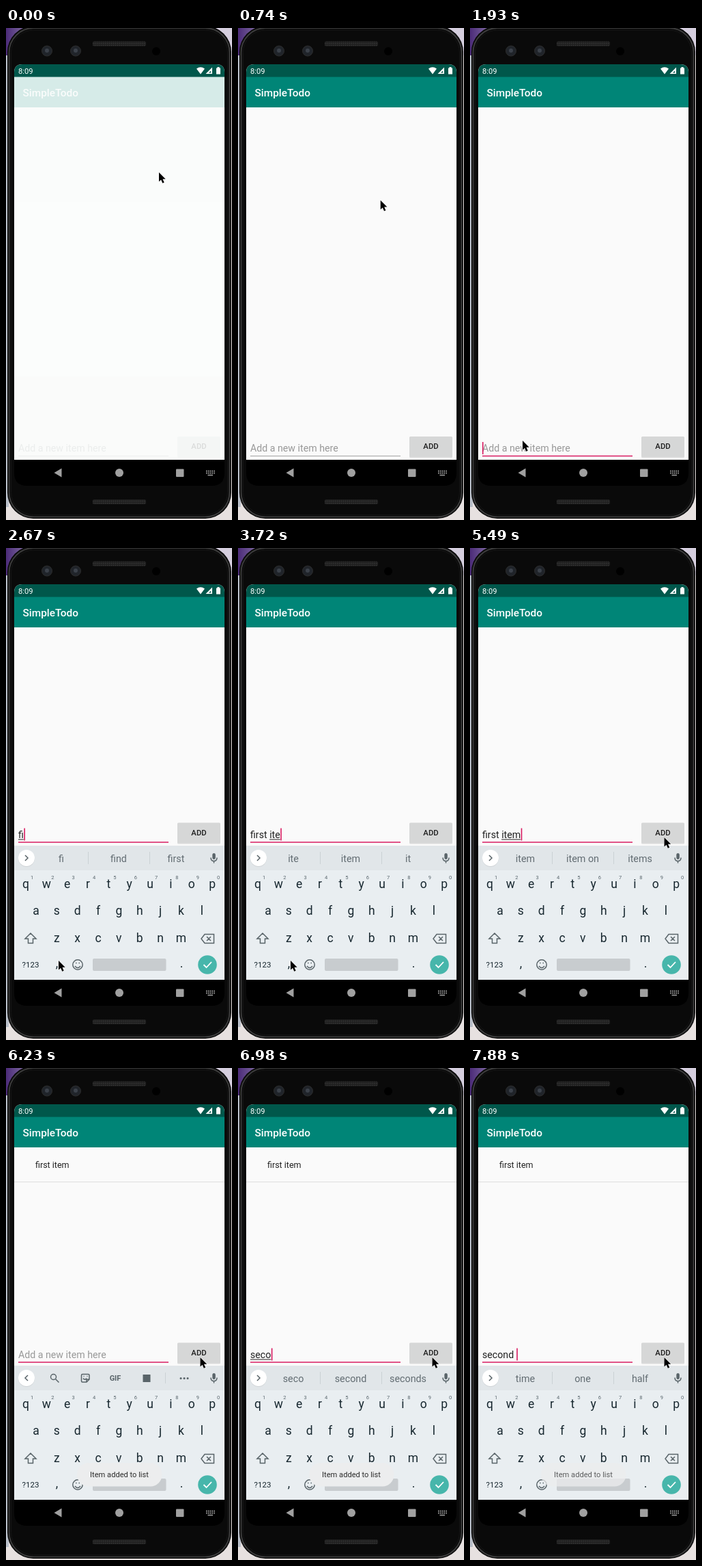
These frames come from a looping animation (331 px wide and 719 px high, 8000 ms). An HTML page:

```html
<!DOCTYPE html>
<html lang="en">
<head>
<meta charset="utf-8">
<title>Todo app demo</title>
<style>
  html, body { margin: 0; width: 100%; height: 100%; overflow: hidden; }
  svg { display: block; width: 331px; height: 719px; }
  text { font-family: Roboto, sans-serif; white-space: pre; }
  .mid { text-anchor: middle; }
  .bold { font-weight: 500; }
  .edit { font-size: 14.2px; }
  .word { font-size: 14.3px; fill: #626c72; }
  .key { font-size: 17.5px; fill: #17272f; }
  .icon { fill: none; stroke: #596469; stroke-width: 1.5; }
</style>
</head>
<body>
<svg viewBox="0 0 331 719">
  <defs>
    <linearGradient id="wall" x2="1">
      <stop offset="0" stop-color="#4b2b78"/>
      <stop offset=".15" stop-color="#a89cc0"/>
      <stop offset=".9" stop-color="#d5cede"/>
    </linearGradient>
    <pattern id="mesh" width="3" height="3" patternUnits="userSpaceOnUse">
      <rect width="3" height="3" fill="#202020"/>
      <circle cx="1.5" cy="1.5" r=".8" fill="#393939"/>
    </pattern>
    <clipPath id="screen"><path d="M12 631V65q0-12 12-12H308q12 0 12 12V631z"/></clipPath>
  </defs>

  <rect width="331" height="719" fill="#e7e1e0"/>
  <rect width="331" height="40" fill="url(#wall)"/>
  <rect y="40" width="4" height="660" fill="#b9bfc9"/>

  <!-- phone body -->
  <rect x="2" y="-3" width="328" height="720" rx="38" fill="#080808"/>
  <rect x="4.5" y="0" width="323" height="714.5" rx="36" fill="#0a0a0a" stroke="#3b3b3b" stroke-width="2"/>
  <rect x="7.5" y="3" width="317" height="708.5" rx="33" fill="#0a0a0a" stroke="#161616"/>
  <rect x="127" y="19.5" width="78" height="7" rx="2" fill="url(#mesh)"/>
  <rect x="127" y="689" width="78" height="7" rx="2" fill="url(#mesh)"/>
  <g fill="#20242a" stroke="#2d2d2d">
    <circle cx="60" cy="33.5" r="7.5"/><circle cx="102" cy="33.5" r="7.5"/>
  </g>
  <g fill="#3b414a"><circle cx="60" cy="33" r="3"/><circle cx="102" cy="33" r="3"/></g>
  <circle cx="220" cy="34" r="6" fill="#000"/>

  <g clip-path="url(#screen)">
    <rect x="12" y="53" width="308" height="578" fill="#fafcfb"/>
    <g id="app">
      <rect x="12" y="71" width="308" height="560" fill="#fafafa"/>
      <rect x="12" y="71" width="308" height="45" fill="#008577"/>
      <text x="24.5" y="100" font-size="15.4" class="bold" fill="#fff">SimpleTodo</text>
      <g id="item">
        <text x="43" y="146" font-size="12.5" fill="#222">first item</text>
        <path d="M12 166.5H320" stroke="#dedede"/>
      </g>
      <g id="form">
        <text id="hint" class="edit" x="18" y="619" fill="#989898">Add a new item here</text>
        <text id="entry" class="edit" x="18" y="619" fill="#202020"></text>
        <path id="compose" stroke="#222"/>
        <path id="line" d="M18 625.5H238"/>
        <rect id="caret" y="605" width="1.6" height="18" fill="#d81b60"/>
        <rect x="251" y="598" width="63" height="30" rx="1.5" fill="#000" opacity=".12"/>
        <rect id="button" x="251" y="597" width="63" height="29.5" rx="1.5"/>
        <text class="mid bold" x="282.5" y="615" font-size="11.3" fill="#1d1d1d">ADD</text>
      </g>
    </g>
    <rect x="12" y="53" width="308" height="18.5" fill="#00574b"/>
    <text x="18" y="67" font-size="11.2" fill="#fff">8:09</text>
    <path d="M279 59.5q6-4.5 12 0l-6 8z" fill="#fff"/>
    <path d="M302 57.500V67H292.500z" fill="#fff"/>
    <path d="M300 62.500V65.500H297z" fill="#00574b"/>
    <path d="M308 58.500h1.500v-1.500h3v1.500h1.500V67.500h-6z" fill="#fff"/>

    <g id="keyboard">
      <rect x="12" y="435" width="308" height="196" fill="#e9eef1"/>
      <rect x="12" y="435" width="308" height="36" fill="#e1e6e9"/>
      <circle cx="30" cy="453.800" r="12" fill="#000" opacity=".12"/>
      <circle cx="30" cy="453" r="12" fill="#fff"/>
      <path id="chevron" class="icon"/>
      <g id="words">
        <path d="M120.500 444V462M210.500 444V462" stroke="#cbd1d4"/>
        <g id="suggest"></g>
      </g>
      <g id="tools" class="icon">
        <circle cx="69.500" cy="451.500" r="4"/><path d="M72.500 454.500l5 5"/>
        <path d="M112 447.500h8.500q1.500 0 1.500 1.500v6l-4 4h-6q-1.500 0-1.500-1.500v-8.500q0-1.500 1.500-1.500zM118 459v-4h4M113 453.500q2.500 3.500 5 0M113.500 450.500h1M118.500 450.500h1"/>
        <rect x="200.500" y="448" width="11" height="11" fill="#596469" stroke="none"/>
        <path d="M233.500 445V461" stroke="#cbd1d4" stroke-width="1"/>
        <path d="M256 453.500h.1M261 453.500h.1M266 453.500h.1" stroke-width="3" stroke-linecap="round"/>
        <text class="mid" x="160" y="457" font-size="11" font-weight="700" fill="#596469" stroke="none">GIF</text>
      </g>
      <rect x="302.300" y="446" width="4.500" height="9" rx="2.250" fill="#596469"/>
      <path class="icon" d="M300 452.500q0 5 4.500 5t4.500-5M304.500 457.500v3"/>
      <g id="keys"></g>
      <path class="icon" d="M36 563l8 8h-4.500v6.500h-7v-6.500H28zM291 564.500h13.500v13H291l-5-6.500zM294 568l6 6M300 568l-6 6"/>
      <text class="mid" x="36" y="613" font-size="11.500" fill="#17272f">?123</text>
      <g class="icon"><circle cx="105" cy="609" r="7.200"/><path d="M101 611q4 5 8 0M102 606.500h1.500M106.500 606.500h1.500"/></g>
      <rect x="127" y="600" width="107.500" height="18" rx="2" fill="#c8cccf"/>
      <circle cx="295" cy="609" r="13.800" fill="#47b6ab"/>
      <path d="M289.500 609l4 4 7.500-8" fill="none" stroke="#fff" stroke-width="1.800"/>
    </g>
    <g id="toast">
      <rect x="104" y="577" width="124.500" height="34.500" rx="17" fill="#ecedee"/>
      <text class="mid" x="166" y="598" font-size="11.100" fill="#2b2b2b">Item added to list</text>
    </g>
  </g>

  <!-- navigation bar -->
  <path d="M12 631H320V650q0 19-19 19H31q-19 0-19-19z" fill="#000"/>
  <g fill="#a0a0a0">
    <path d="M70.500 650l11-6.500v13z"/>
    <circle cx="166" cy="650" r="6"/>
    <rect x="249" y="644.500" width="11.500" height="11.500" rx="1"/>
    <path d="M293 647.500H306M293 650.500H306" stroke="#a0a0a0" stroke-width="1.800" stroke-dasharray="1.600 1.200"/>
    <path d="M295.500 653.500H303" stroke="#a0a0a0" stroke-width="1.500"/>
  </g>
  <path id="mouse" d="M0 0V13.500L3.100 10.700L5.300 15.800L7.700 14.700L5.500 9.800H9.700z" fill="#000" stroke="#fff" stroke-width="1" paint-order="stroke"/>
</svg>
<script>
const $ = id => document.getElementById(id);
const set = (id, attrs) => {
  for (const name in attrs) $(id).setAttribute(name, attrs[name]);
};
const show = (id, on) => set(id, { opacity: +on });
const pen = document.createElement('canvas').getContext('2d');
const width = text => {
  pen.font = '14.2px Roboto, sans-serif';
  return pen.measureText(text).width;
};

const label = (cls, x, y, text, extra = '') =>
  `<text class="mid ${cls}" x="${x}" y="${y}" ${extra}>${text}</text>`;
const row = (letters, x, y) =>
  [...letters].map((c, i) => label('key', x + i * 30.35, y, c)).join('');
$('keys').innerHTML = row('qwertyuiop', 29, 496.5) + row('asdfghjkl', 44, 536) +
  row('zxcvbnm', 74.3, 575.5) + label('key', 74.5, 613, ',') + label('key', 257, 613, '.') +
  [...'1234567890'].map((c, i) => label('', 38 + i * 30.35, 484, c, 'font-size="7.5" fill="#59666d"')).join('');

// [time, typed text, suggestions]
const typing = [
  [0, '', ''],
  [2670, 'fi', 'fi,find,first'],
  [2820, 'fir', 'fir,first,fire'],
  [2970, 'firs', 'firs,first,firsthand'],
  [3120, 'first', 'first,firstly,firsthand'],
  [3270, 'first ', 'time,one,of'],
  [3420, 'first i', 'i,in,is'],
  [3570, 'first it', 'it,its,is'],
  [3720, 'first ite', 'ite,item,it'],
  [4310, 'first item', 'item,item on,items'],
  [5780, '', ''],
  [6380, 's', 's,so,see'],
  [6530, 'se', 'se,see,send'],
  [6830, 'sec', 'sec,second,secret'],
  [6980, 'seco', 'seco,second,seconds'],
  [7130, 'second', 'second,seconds,secondary'],
  [7280, 'second ', 'second,seconds,secondary'],
  [7580, 'second ', 'time,one,half'],
];
// [time, value] lists holding each value until the next
const fade = [[0, 0], [5780, .3], [5930, .7], [6080, 1], [7880, .75]];
const slide = [[0, 196], [2080, 120], [2230, 30], [2380, 0]];
const press = [[0, '#d6d7d7'], [5640, '#c2c3c3'], [5780, '#b9baba'], [5930, '#c6c7c7'], [6080, '#d0d1d1'], [6230, '#d6d7d7']];
const at = (list, t) => list.findLast(entry => entry[0] <= t);

// Pointer stops, each reached in five 150 ms steps
const stops = [[-1000, 224, 211], [740, 77, 603], [4760, 284.5, 423]];
function pointer(t) {
  const i = stops.findLastIndex(stop => stop[0] <= t);
  const [start, x, y] = stops[i], [, x0, y0] = stops[Math.max(i - 1, 0)];
  const p = Math.min(1, (Math.floor((t - start) / 150) + 1) / 5);
  const e = p * p * (3 - 2 * p);
  return `translate(${x0 + (x - x0) * e} ${y0 + (y - y0) * e})`;
}

function render(t) {
  const [, text, words] = at(typing, t);
  const focused = t >= 1630;
  set('app', { opacity: t < 140 ? .14 : 1 });
  show('item', t >= 5780);
  set('form', { transform: `translate(0 ${t >= 2080 ? -195.500 : 0})` });
  show('hint', !text);
  $('entry').textContent = text;

  const wordStart = 18 + width(text.slice(0, text.lastIndexOf(' ') + 1));
  const end = 18 + width(text);
  set('compose', { d: `M${wordStart} 621.500H${end}` });
  show('compose', text && !text.endsWith(' '));
  set('line', { stroke: focused ? '#d81b60' : '#8c8c8c', 'stroke-width': focused ? 1.6 : .8 });
  set('caret', { x: end + (text ? .5 : 0) });
  show('caret', focused && !(t >= 6230 && t < 6380));
  set('button', { fill: at(press, t)[1] });

  set('keyboard', { transform: `translate(0 ${at(slide, t)[1]})` });
  set('chevron', { d: words ? 'M28 449l4 4-4 4' : 'M32 449l-4 4 4 4' });
  show('words', words);
  show('tools', !words);
  $('suggest').innerHTML = words.split(',').map((w, i) => label('word', 81 + i * 84, 459, w)).join('');
  set('suggest', { opacity: t >= 7580 && t < 7880 ? .6 : 1 });
  show('toast', at(fade, t)[1]);
  set('mouse', { transform: pointer(t) });
}

const begin = performance.now();
function tick() {
  render((performance.now() - begin) % 8000);
  requestAnimationFrame(tick);
}
tick();
</script>
</body>
</html>
```
